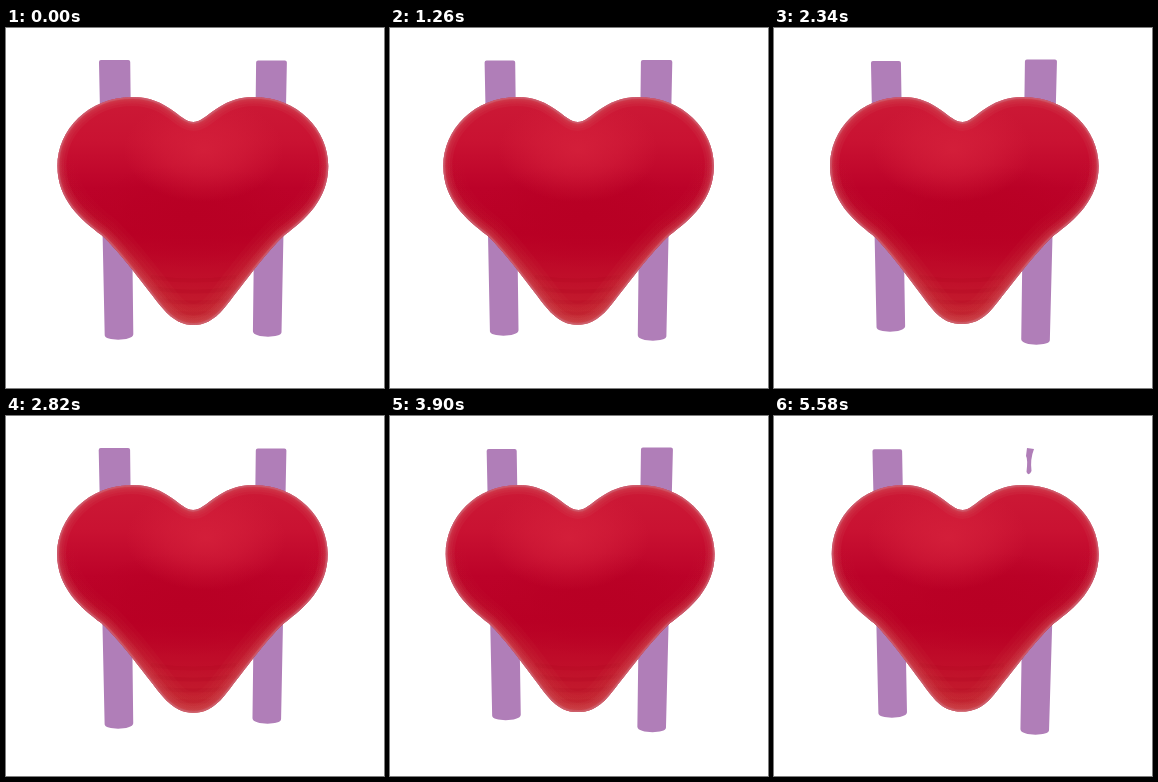
An HTML page with a canvas that plays this animation: 378x360 px, repeating every 5.61 s.

```html
<!DOCTYPE html>
<html lang="en">
<head>
<meta charset="utf-8">
<title>Swinging heart</title>
<style>
html, body { margin: 0; width: 100%; height: 100%; overflow: hidden; background: #fff; }
canvas { display: block; }
</style>
</head>
<body>
<canvas id="stage" width="378" height="360"></canvas>
<script>
const ctx = document.getElementById('stage').getContext('2d');
const LOOP = 5610, STEP = 30, MID = 187.5;
const PURPLE = '#b07eb8';

// [time, turn]: positive turns bring the right side forward
const SWING = [[0, -3], [300, -14], [590, -21.5], [920, -11], [1260, 5], [1600, 11.5],
  [1920, 21], [2010, 22], [2280, 15], [2820, -5], [3130, -16], [3420, -3],
  [3990, 14], [4410, 16], [4900, 17.5], [5580, 17]];

function slope(i) {
  const a = SWING[i - 1], b = SWING[i], c = SWING[i + 1];
  if (!a || !c || (b[1] - a[1]) * (c[1] - b[1]) <= 0) return 0;
  return (c[1] - a[1]) / (c[0] - a[0]);
}

function turnAt(t) {
  let i = 0;
  while (i < SWING.length - 2 && SWING[i + 1][0] <= t) i++;
  const [t0, a] = SWING[i], [t1, b] = SWING[i + 1], d = t1 - t0;
  const s = Math.min(1, (t - t0) / d), r = 1 - s;
  return a * r * r * (1 + 2 * s) + b * s * s * (3 - 2 * s) +
    d * s * r * (slope(i) * r - slope(i + 1) * s);
}

// One side is described for the left; the right is its mirror with the opposite turn.
const edge = q => 52 + .22 * q + .007 * q * q;

function leg(q, side, cut) {
  const X = x => MID + side * (MID - x);
  const top = 32.3 + .06 * q, end = 308.8 - .5 * q;
  const a = 109 + .15 * q + .006 * q * q, w = 15.5 - .04 * q;
  const b = 113.3 + .13 * q + .011 * q * q, v = 14.3;
  ctx.fillStyle = PURPLE;
  ctx.beginPath();
  if (cut) {
    ctx.moveTo((X(a - w) + X(b - v)) / 2, 180);
    ctx.lineTo((X(a + w) + X(b + v)) / 2, 180);
  } else {
    ctx.moveTo(X(a - w), top + 2);
    ctx.quadraticCurveTo(X(a - w), top, X(a - w + 2), top);
    ctx.lineTo(X(a + w - 2), top);
    ctx.quadraticCurveTo(X(a + w), top, X(a + w), top + 2);
  }
  ctx.lineTo(X(b + v), end - 4);
  ctx.bezierCurveTo(X(b + v), end + 3, X(b - v), end + 3, X(b - v), end - 3);
  ctx.fill();
}

function scrap() {
  ctx.beginPath();
  ctx.moveTo(253, 32);
  ctx.lineTo(260, 33);
  ctx.quadraticCurveTo(256, 43, 257.5, 55);
  ctx.quadraticCurveTo(255, 61, 252.5, 56);
  ctx.quadraticCurveTo(254, 43, 252, 40);
  ctx.fill();
}

function heartPath(q) {
  const path = new Path2D(), dip = MID + q * .08, tip = 297.3 - Math.abs(q) * .1;
  const half = side => {
    const k = (MID - edge(-side * q)) / 136;
    const curve = (a, b, c, d, e, f) =>
      path.bezierCurveTo(MID + side * a * k, b, MID + side * c * k, d, MID + side * e * k, f);
    return { k, curve };
  };
  const r = half(1), l = half(-1);
  path.moveTo(dip, 94);
  r.curve(14, 94, 25, 69, 61, 69);
  r.curve(105, 69, 136, 102, 136, 138);
  r.curve(136, 172, 112, 192, 92, 207);
  r.curve(72, 225, 46, 262, 31, 280);
  r.curve(20, 293, 10, tip, 0, tip);
  l.curve(10, tip, 20, 293, 31, 280);
  l.curve(46, 262, 72, 225, 92, 207);
  l.curve(112, 192, 136, 172, 136, 138);
  l.curve(136, 102, 105, 69, 61, 69);
  path.bezierCurveTo(MID - 25 * l.k, 69, MID - 14 * l.k, 94, dip, 94);
  return path;
}

function fade(y0, y1, ...colors) {
  const g = ctx.createLinearGradient(0, y0, 0, y1);
  colors.forEach((c, i) => g.addColorStop(i / (colors.length - 1), c));
  return g;
}

function glow(x, y, rx, ry, rgb, alpha) {
  const g = ctx.createRadialGradient(0, 0, 0, 0, 0, 1);
  g.addColorStop(0, `rgba(${rgb},${alpha})`);
  g.addColorStop(.5, `rgba(${rgb},${alpha * .6})`);
  g.addColorStop(1, `rgba(${rgb},0)`);
  ctx.save();
  ctx.translate(x, y);
  ctx.scale(rx, ry);
  ctx.fillStyle = g;
  ctx.fillRect(-1, -1, 2, 2);
  ctx.restore();
}

function rim(path, style, widths) {
  ctx.strokeStyle = style;
  for (const w of widths) {
    ctx.lineWidth = w;
    ctx.stroke(path);
  }
}

function heart(q) {
  const path = heartPath(q);
  ctx.save();
  ctx.clip(path);
  ctx.fillStyle = fade(68, 298, '#cc1a36', '#c91232', '#bc0229', '#ba0025', '#c00f2a', '#c4252f');
  ctx.fillRect(40, 60, 300, 245);
  glow(MID + q * 1.6, 188, 115, 52, '184,0,36', 1);
  glow(194 - q * 1.2, 122, 80, 52, '214,34,60', .8);
  ctx.strokeStyle = 'rgba(176,8,32,.28)';
  ctx.lineWidth = 4;
  for (let y = 251; y < 290; y += 11) {
    ctx.beginPath();
    ctx.moveTo(145, y - 2);
    ctx.quadraticCurveTo(MID, y + 5, 230, y - 2);
    ctx.stroke();
  }
  rim(path, fade(130, 250, 'rgba(200,60,62,0)', 'rgba(200,60,62,.11)'), [42, 34, 27, 20, 14]);
  rim(path, 'rgba(208,88,96,.13)', [18, 13, 9, 7, 5]);
  rim(path, 'rgba(204,122,140,.3)', [4, 2.5]);
  ctx.restore();
}

function draw(now) {
  const t = Math.floor(now % LOOP / STEP) * STEP, q = turnAt(t);
  const cut = t >= 5460;
  ctx.fillStyle = '#fff';
  ctx.fillRect(0, 0, 378, 360);
  leg(q, -1, false);
  leg(-q, 1, cut);
  if (cut) scrap();
  heart(q);
}

const start = performance.now();
function tick() {
  draw(performance.now() - start);
  requestAnimationFrame(tick);
}
tick();
</script>
</body>
</html>
```
